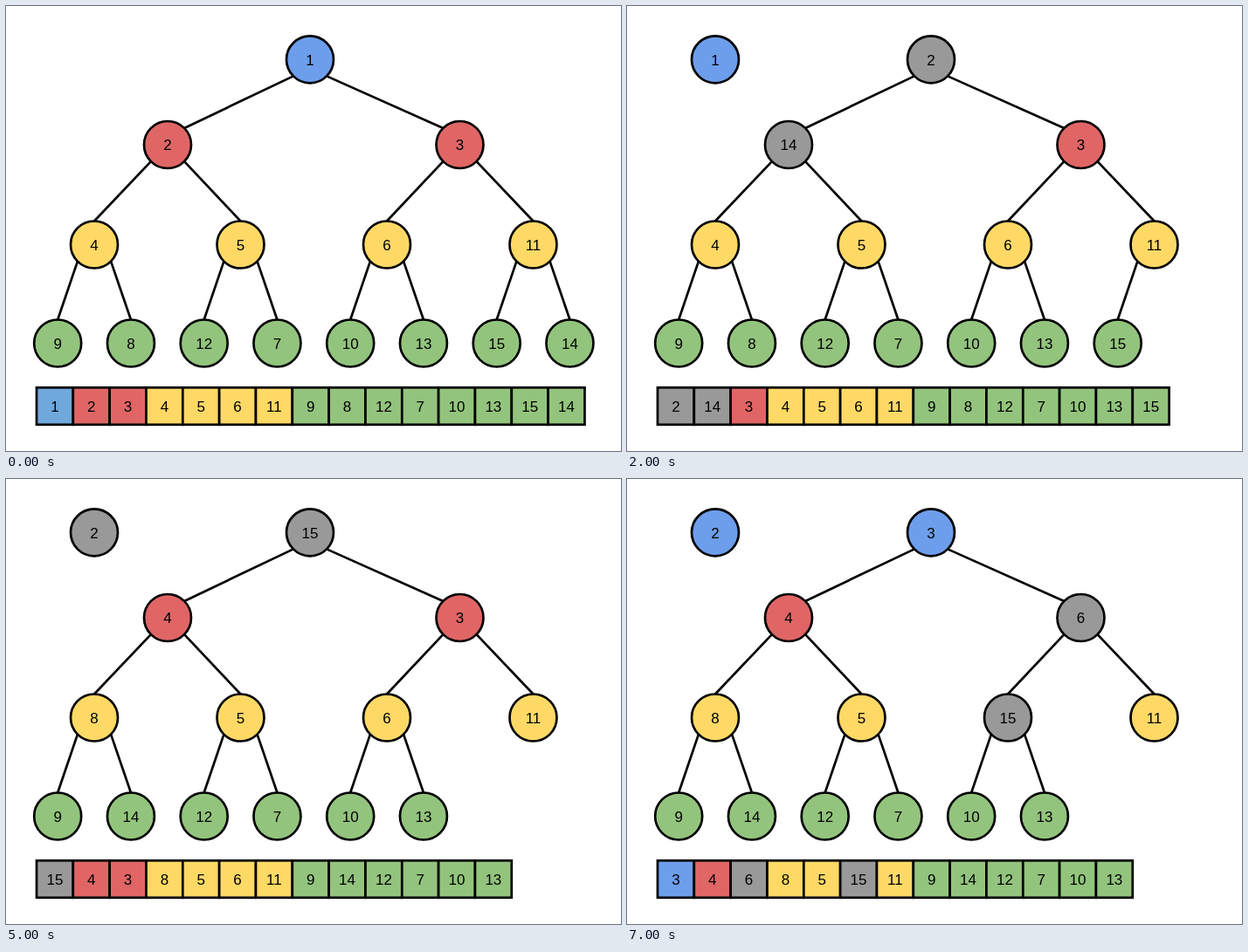
An HTML page for the animation above (8000 ms loop, 704 by 510 pixels).

```html
<!DOCTYPE html>
<html lang="en">
<head>
<meta charset="utf-8">
<title>Binary heap: extracting the minimum</title>
<style>
html, body { margin: 0; width: 100%; height: 100%; overflow: hidden; background: #fff; }
svg { display: block; width: 704px; height: 510px; }
circle, rect, line { stroke: #000; stroke-width: 2.7; }
text { font: 17px "Liberation Sans", Arial, sans-serif; text-anchor: middle; fill: #000; }
</style>
</head>
<body>
<svg id="stage" viewBox="0 0 704 510"></svg>
<script>
const STEP = 1000;
const BLUE = '#6d9eeb', GRAY = '#999999';
const LEVELS = [BLUE, '#e06666', '#ffd966', '#93c47d'];
const R = 27, DIAG = R * Math.SQRT1_2;
const CELL = { x: 35, y: 437.3, w: 41.83, h: 42.5 };

// Node centres in heap order.
const NODES = [[348, 61.3], [185, 159], [519.5, 159]];
for (let i = 0; i < 4; i++) NODES.push([101 + i * 167.5, 273.5]);
for (let i = 0; i < 8; i++) NODES.push([59.2 + i * 83.75, 386.5]);

// Each step swaps values or moves the last one to the root; "hot" nodes are gray.
const STEPS = [
  { hot: [] },
  { pop: true, hot: [0] },
  { swap: [0, 1], hot: [0, 1] },
  { swap: [1, 3], hot: [1, 3] },
  { swap: [3, 8], hot: [3, 8] },
  { pop: true, hot: [0], hotOut: true },
  { swap: [0, 2], hot: [0, 2] },
  { swap: [2, 5], hot: [2, 5] }
];

const label = (x, y, s) => `<text x="${x}" y="${y + 6.2}">${s}</text>`;
const node = ([x, y], value, fill) =>
  `<circle cx="${x}" cy="${y}" r="${R}" fill="${fill}"/>` + label(x, y, value);

function edge(i) {
  const parent = NODES[(i - 1) >> 1], [x, y] = NODES[i];
  const side = i % 2 ? -1 : 1;
  const end = i < 3 ? [x - side * DIAG, y - DIAG] : [x, y - R];
  return `<line x1="${parent[0] + side * DIAG}" y1="${parent[1] + DIAG}" x2="${end[0]}" y2="${end[1]}"/>`;
}

function cell(i, value, fill) {
  const x = CELL.x + i * CELL.w;
  return `<rect x="${x}" y="${CELL.y}" width="${CELL.w}" height="${CELL.h}" fill="${fill}"/>` +
    label(x + CELL.w / 2, CELL.y + CELL.h / 2, value);
}

function render(heap, out, step, first) {
  const color = i => step.hot.includes(i) ? GRAY : LEVELS[Math.floor(Math.log2(i + 1))];
  const edges = heap.map((_, i) => i ? edge(i) : '');
  const nodes = heap.map((v, i) => node(NODES[i], v, color(i)));
  const cells = heap.map((v, i) => cell(i, v, first && i === 0 ? '#6fa8dc' : color(i)));
  const removed = out ? node([101, 61.3], out, step.hotOut ? GRAY : BLUE) : '';
  return [...edges, ...nodes, ...cells, removed].join('');
}

const heap = [1, 2, 3, 4, 5, 6, 11, 9, 8, 12, 7, 10, 13, 15, 14];
let out = null;
const scenes = STEPS.map((step, n) => {
  if (step.pop) {
    out = heap[0];
    heap[0] = heap.pop();
  } else if (step.swap) {
    const [a, b] = step.swap;
    [heap[a], heap[b]] = [heap[b], heap[a]];
  }
  return render(heap, out, step, n === 0);
});

const stage = document.getElementById('stage');
const start = performance.now();
let shown = -1;
function tick() {
  const n = Math.floor((performance.now() - start) / STEP) % scenes.length;
  if (n !== shown) stage.innerHTML = scenes[shown = n];
  requestAnimationFrame(tick);
}
tick();
</script>
</body>
</html>
```
